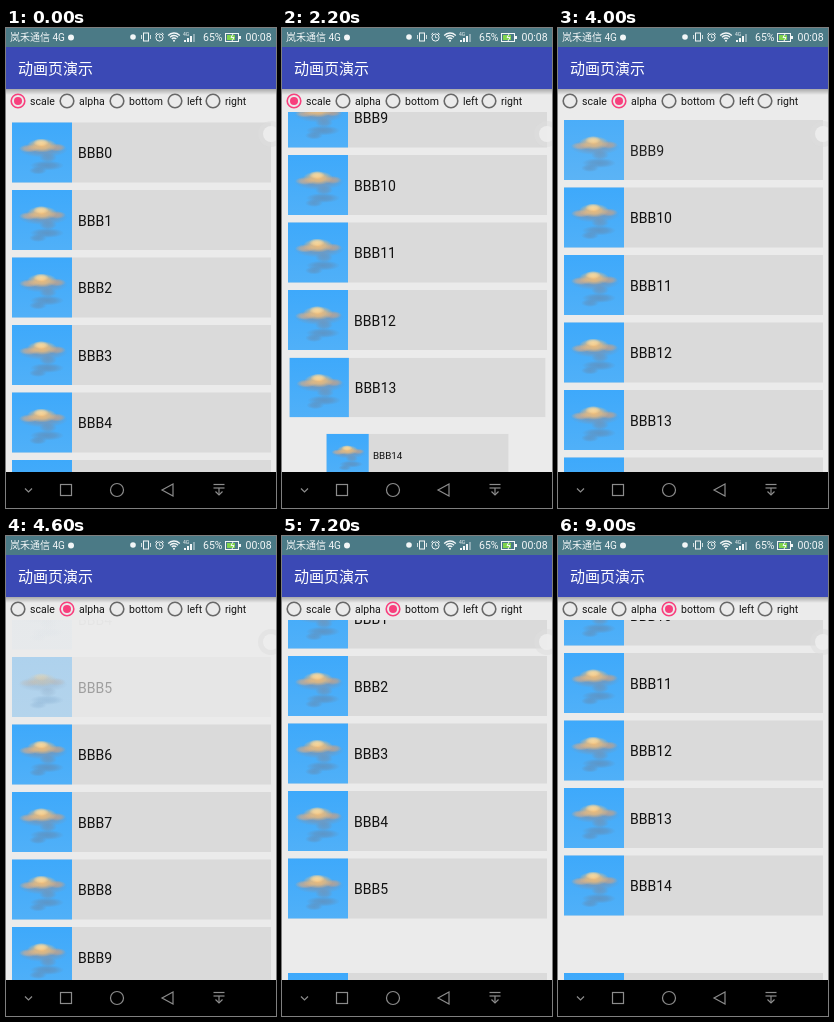
An HTML page with a canvas that plays this animation: 270 px wide and 480 px high, repeating every 9.2 s.

```html
<!DOCTYPE html>
<html lang="zh">
<head>
<meta charset="utf-8">
<title>动画页演示</title>
<style>
html, body { margin: 0; width: 100%; height: 100%; overflow: hidden; background: #ebebeb; }
canvas { display: block; width: 270px; height: 480px; }
</style>
</head>
<body>
<canvas id="stage"></canvas>
<script>
const W = 270, H = 480, LOOP = 9200, STEP = 200;
const LIST_TOP = 84, LIST_END = 444, FIRST = 94.5, PITCH = 67.5, CARD = 60, ENTER_MS = 300;
const LATIN = 'Roboto, sans-serif', HAN = 'Roboto, "Noto Sans CJK SC", "Noto Sans CJK", sans-serif';

const canvas = document.getElementById('stage');
const ctx = canvas.getContext('2d');
const ratio = window.devicePixelRatio || 1;
canvas.width = W * ratio;
canvas.height = H * ratio;

// Each phase scrolls one way; keys are [time, offset].
const phases = [
  { until: 3200, dir: 1, keys: [[600, 0], [1160, 258], [1322, 325.5], [1400, 340], [1600, 405],
    [2000, 565], [2400, 720], [2700, 758]] },
  { until: 7000, dir: -1, keys: [[3400, 758], [4000, 610], [4260, 475], [4500, 408], [4592, 340],
    [4600, 311], [5000, 185], [5600, 80], [5800, 0]] },
  { until: LOOP, dir: 1, keys: [[7040, 0], [7135, 55.5], [7200, 109.5], [7600, 200], [7737, 258],
    [7935, 325.5], [8000, 397.5], [8200, 470], [8400, 530], [8700, 597], [8950, 663], [9000, 720]] }
];
const options = [['scale', 12], ['alpha', 61], ['bottom', 111], ['left', 169], ['right', 207]];

const clamp = v => Math.max(0, Math.min(1, v));

// Piecewise linear lookup: column `from` to column `to`.
function lookup(keys, value, from, to) {
  const sign = Math.sign(keys[keys.length - 1][from] - keys[0][from]);
  if ((value - keys[0][from]) * sign <= 0) return keys[0][to];
  for (let i = 1; i < keys.length; i++) {
    const a = keys[i - 1], b = keys[i];
    if ((value - b[from]) * sign <= 0) {
      return a[to] + (b[to] - a[to]) * (value - a[from]) / (b[from] - a[from]);
    }
  }
  return keys[keys.length - 1][to];
}

function entryProgress(n, phase, t) {
  const edge = phase.dir > 0 ? FIRST + n * PITCH - LIST_END : FIRST + n * PITCH + CARD - LIST_TOP;
  if ((edge - phase.keys[0][1]) * phase.dir <= 0) return 1;
  return clamp((t - lookup(phase.keys, edge, 1, 0)) / ENTER_MS);
}

function text(str, x, y, size, color, family = LATIN, weight = 400) {
  ctx.font = `${weight} ${size}px ${family}`;
  ctx.fillStyle = color;
  ctx.fillText(str, x, y);
}

function rect(x, y, w, h, color) {
  ctx.fillStyle = color;
  ctx.fillRect(x, y, w, h);
}

function disc(x, y, r, color) {
  ctx.fillStyle = color;
  ctx.beginPath();
  ctx.arc(x, y, r, 0, Math.PI * 2);
  ctx.fill();
}

function arc(x, y, r, color, width, from = 0, to = Math.PI * 2) {
  ctx.strokeStyle = color;
  ctx.lineWidth = width;
  ctx.beginPath();
  ctx.arc(x, y, r, from, to);
  ctx.stroke();
}

function line(points, color, width, closed) {
  ctx.strokeStyle = color;
  ctx.lineWidth = width;
  ctx.beginPath();
  points.forEach(([x, y]) => ctx.lineTo(x, y));
  if (closed) ctx.closePath();
  ctx.stroke();
}

function blob(x, y, rx, ry, rgb, alpha) {
  ctx.save();
  ctx.translate(x, y);
  ctx.scale(rx, ry);
  const g = ctx.createRadialGradient(0, 0, 0, 0, 0, 1);
  g.addColorStop(0, `rgba(${rgb},${alpha})`);
  g.addColorStop(0.5, `rgba(${rgb},${alpha * 0.75})`);
  g.addColorStop(1, `rgba(${rgb},0)`);
  disc(0, 0, 1, g);
  ctx.restore();
}

function picture() {
  const sky = ctx.createLinearGradient(0, 0, 0, CARD);
  sky.addColorStop(0, '#3ea9fb');
  sky.addColorStop(1, '#50b0f8');
  rect(0, 0, CARD, CARD, sky);
  blob(31, 27, 25, 8, '126,146,172', 0.8);
  blob(35, 43, 17, 5, '98,142,184', 0.75);
  blob(26, 48, 9, 4, '98,142,184', 0.65);
  blob(36, 35, 9, 5, '118,142,170', 0.6);
  blob(17, 26, 10, 4, '224,176,132', 0.7);
  blob(45, 25, 9, 4, '206,164,132', 0.7);
  blob(30, 23, 15, 7, '247,191,118', 0.95);
  blob(29, 20, 8, 4, '255,222,160', 0.8);
}

function card(n, y, mode, p) {
  ctx.save();
  ctx.translate(6, y);
  if (mode === 0) {
    const s = 0.5 + p / 2;
    ctx.translate(129.5, CARD / 2);
    ctx.scale(s, s);
    ctx.translate(-129.5, -CARD / 2);
  } else if (mode === 1) {
    ctx.globalAlpha = p;
  } else {
    ctx.translate(0, CARD * (1 - p));
  }
  rect(0, 0, 259, CARD, '#dadada');
  picture();
  text('BBB' + n, 66, 35.5, 14, '#111');
  ctx.restore();
}

function list(t, mode) {
  const phase = phases.find(p => t < p.until);
  const offset = lookup(phase.keys, t, 0, 1);
  ctx.save();
  ctx.beginPath();
  ctx.rect(0, LIST_TOP, W, LIST_END - LIST_TOP);
  ctx.clip();
  for (let n = 0; n < 20; n++) {
    const y = FIRST + n * PITCH - offset;
    if (y > LIST_END || y + CARD < LIST_TOP) continue;
    const p = entryProgress(n, phase, t);
    if (p > 0) card(n, y, mode, p);
  }
  ctx.restore();
}

function statusBar() {
  const white = '#f2f6f7';
  rect(0, 0, W, 19, '#4b7a86');
  text('岚禾通信 4G', 4, 13, 10, white, HAN);
  disc(65, 9.5, 3, white);
  disc(127, 9, 2.8, white);
  ctx.strokeStyle = white;
  ctx.lineWidth = 1;
  ctx.strokeRect(137.5, 5, 5, 8);
  line([[135.5, 7], [135.5, 11]], white, 0.8);
  line([[144.5, 7], [144.5, 11]], white, 0.8);
  arc(153.5, 9.5, 3.6, white, 1);
  line([[153.5, 7.3], [153.5, 9.7], [155.3, 9.7]], white, 0.8);
  line([[149.3, 6.5], [151.2, 4.8]], white, 1);
  line([[155.8, 4.8], [157.7, 6.5]], white, 1);
  [3, 5.5, 8].forEach(r => arc(168, 13, r, white, 1.3, -Math.PI * 0.76, -Math.PI * 0.24));
  disc(168, 12.8, 1, white);
  text('4G', 177, 7.5, 5, white);
  for (let i = 0; i < 4; i++) {
    rect(178 + i * 3, 12 - i * 2, 2, 2 + i * 2, i < 3 ? white : 'rgba(242,246,247,.4)');
  }
  text('65%', 197, 13, 10.5, white);
  ctx.lineWidth = 1;
  ctx.strokeStyle = white;
  ctx.strokeRect(219.5, 5.5, 13, 8);
  rect(233, 8, 2, 3, white);
  rect(221, 7, 8, 5, '#7fd44c');
  line([[227, 6], [225, 9.5], [228, 9.5], [226, 13]], white, 1);
  text('00:08', 239.5, 13, 10.5, white);
}

function header(mode) {
  rect(0, 61, W, LIST_TOP - 61, '#ebebeb');
  const shade = ctx.createLinearGradient(0, 61, 0, 67);
  shade.addColorStop(0, 'rgba(0,0,0,.28)');
  shade.addColorStop(1, 'rgba(0,0,0,0)');
  rect(0, 61, W, 6, shade);
  rect(0, 19, W, 42, '#3b49b5');
  text('动画页演示', 12, 46, 15, '#fff', HAN, 500);
  options.forEach(([label, x], i) => {
    const on = i === mode;
    arc(x, 73, 6.8, on ? '#f83f7d' : '#686868', 1.6);
    if (on) disc(x, 73, 4, '#f83f7d');
    text(label, x + 12, 77, 10.5, '#151515');
  });
}

function navBar() {
  const grey = '#8c8c8c';
  rect(0, LIST_END, W, H - LIST_END, '#000');
  line([[19, 460.5], [22.5, 464], [26, 460.5]], grey, 1.2);
  ctx.lineWidth = 1.2;
  ctx.strokeRect(54.5, 456.5, 11, 11);
  arc(111, 462, 6.5, grey, 1.2);
  line([[156, 462], [167, 456], [167, 468]], grey, 1.2, true);
  line([[207.5, 456.5], [218.5, 456.5]], grey, 1.2);
  line([[207.5, 460], [218.5, 460]], grey, 1.2);
  line([[213, 460], [213, 467]], grey, 1.2);
  line([[209.5, 463.5], [213, 467], [216.5, 463.5]], grey, 1.2);
}

function draw(t) {
  const mode = t < 2800 ? 0 : t < 6200 ? 1 : 2;
  ctx.setTransform(ratio, 0, 0, ratio, 0, 0);
  rect(0, 0, W, H, '#ebebeb');
  list(t, mode);
  header(mode);
  statusBar();
  disc(265, 106, 13, 'rgba(222,222,222,.5)');
  disc(265, 106, 8, 'rgba(238,238,238,.85)');
  navBar();
}

const start = performance.now();
function tick() {
  const t = (performance.now() - start) % LOOP;
  draw(Math.floor(t / STEP) * STEP);
  requestAnimationFrame(tick);
}
tick();
</script>
</body>
</html>
```
